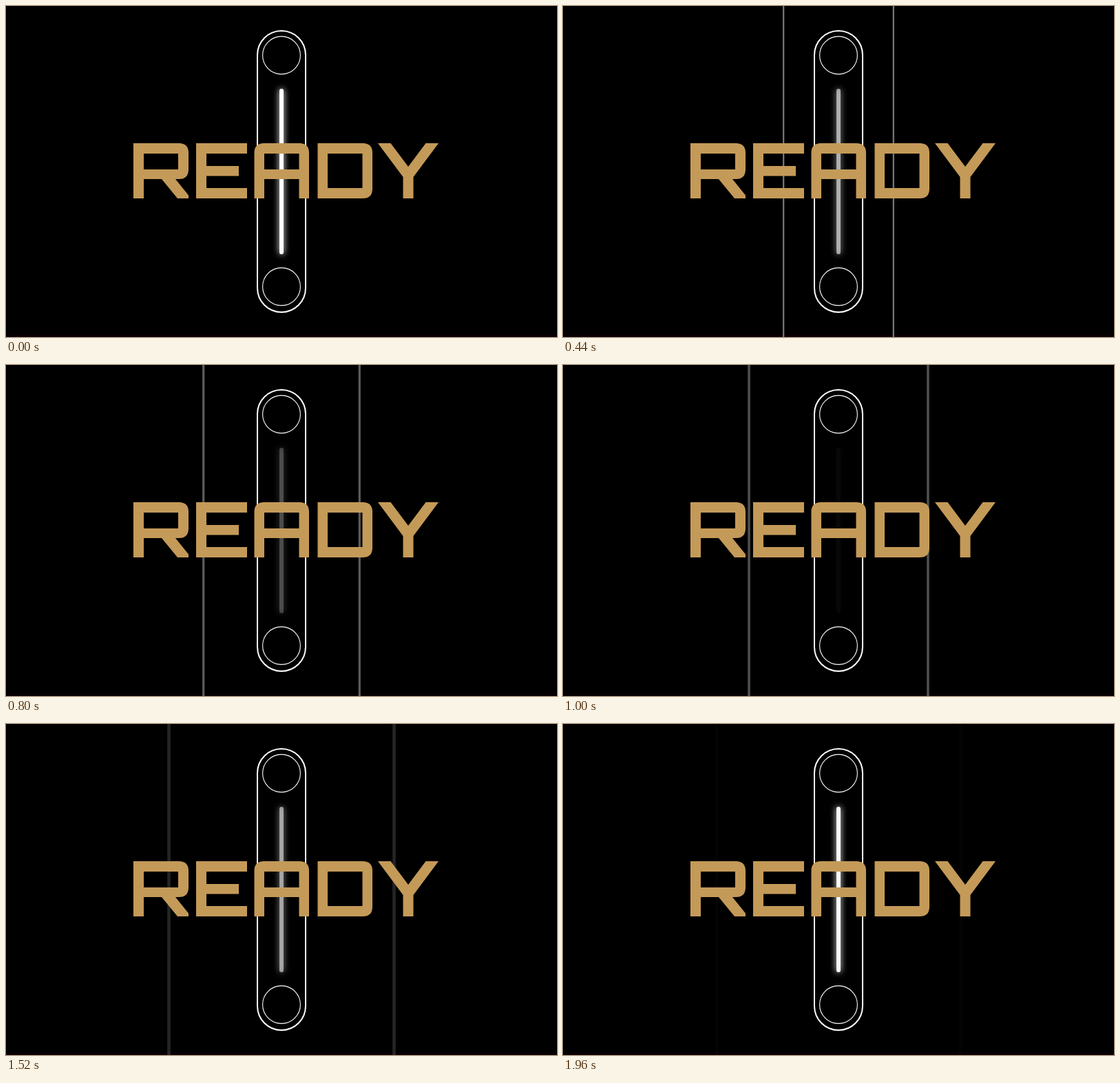
These frames come from a looping animation (800 px wide and 480 px high, 2 s). An HTML page with a canvas:

```html
<!DOCTYPE html>
<html lang="en">
<head>
<meta charset="utf-8">
<title>Ready</title>
<style>
  html, body { margin: 0; width: 100%; height: 100%; overflow: hidden; background: #000; }
  canvas { display: block; }
</style>
</head>
<body>
<canvas id="stage" width="800" height="480" role="img" aria-label="READY"></canvas>
<script>
const LOOP = 2000, STEP = 40, CX = 400;
const ctx = document.getElementById('stage').getContext('2d');

// Letter outlines, filled with the even-odd rule
const letters = [
  'M185 199H251Q265 199 265 213V237Q265 251 251 251H246L265 274.5V279H249L226 251H200V279H185ZM200 214V237H250V214Z',
  'M276 199H350V214H291V232H338V246.5H291V264H350V279H276Z',
  'M360.5 279V213Q360.5 199 374.5 199H426Q440 199 440 213V279H425.5V251H375V279ZM375 214V237H425.5V214Z',
  'M452.5 199H518Q532 199 532 213V265Q532 279 518 279H452.5ZM467 214V264H517.5V214Z',
  'M540 199H558.5L584 233L609.5 199H628L591.5 248V279H576.5V248Z'
];
const word = new Path2D(letters.join(''));

function pill(x, y, w, h) {
  ctx.beginPath();
  ctx.roundRect(x, y, w, h, w / 2);
}

function ring(y) {
  ctx.beginPath();
  ctx.arc(CX, y, 27.4, 0, Math.PI * 2);
  ctx.stroke();
}

// Two rails that spread from the case, growing thicker and fading
function rails(t) {
  const p = t * (1.44 - 0.44 * t * t);
  const reach = 36 + 144 * p, w = 1 + 4 * p;
  ctx.globalAlpha = 0.6 * (1 - t);
  ctx.fillStyle = '#fff';
  ctx.fillRect(CX - reach, 0, w, 480);
  ctx.fillRect(CX + reach - w, 0, w, 480);
  ctx.globalAlpha = 1;
}

function glowBar(t) {
  ctx.save();
  ctx.globalAlpha = 0.025 + 0.975 * Math.abs(1 - 2 * t);
  ctx.shadowColor = '#fff';
  ctx.shadowBlur = 10;
  ctx.fillStyle = '#fff';
  pill(397, 120, 6, 240);
  ctx.fill();
  ctx.restore();
}

function draw(t) {
  ctx.fillStyle = '#000';
  ctx.fillRect(0, 0, 800, 480);
  ctx.fillStyle = '#080003';
  ctx.fillRect(0, 476, 800, 4);
  if (t > 0) rails(t);

  ctx.strokeStyle = '#fff';
  ctx.lineWidth = 2;
  pill(365, 36, 70, 408);
  ctx.stroke();
  ctx.lineWidth = 1.1;
  ring(71.5);
  ring(407);
  glowBar(t);

  ctx.fillStyle = '#c49a58';
  ctx.fill(word, 'evenodd');
}

const start = performance.now();
function tick() {
  const ms = (performance.now() - start) % LOOP;
  draw(Math.floor(ms / STEP) * STEP / LOOP);
  requestAnimationFrame(tick);
}
tick();
</script>
</body>
</html>
```
